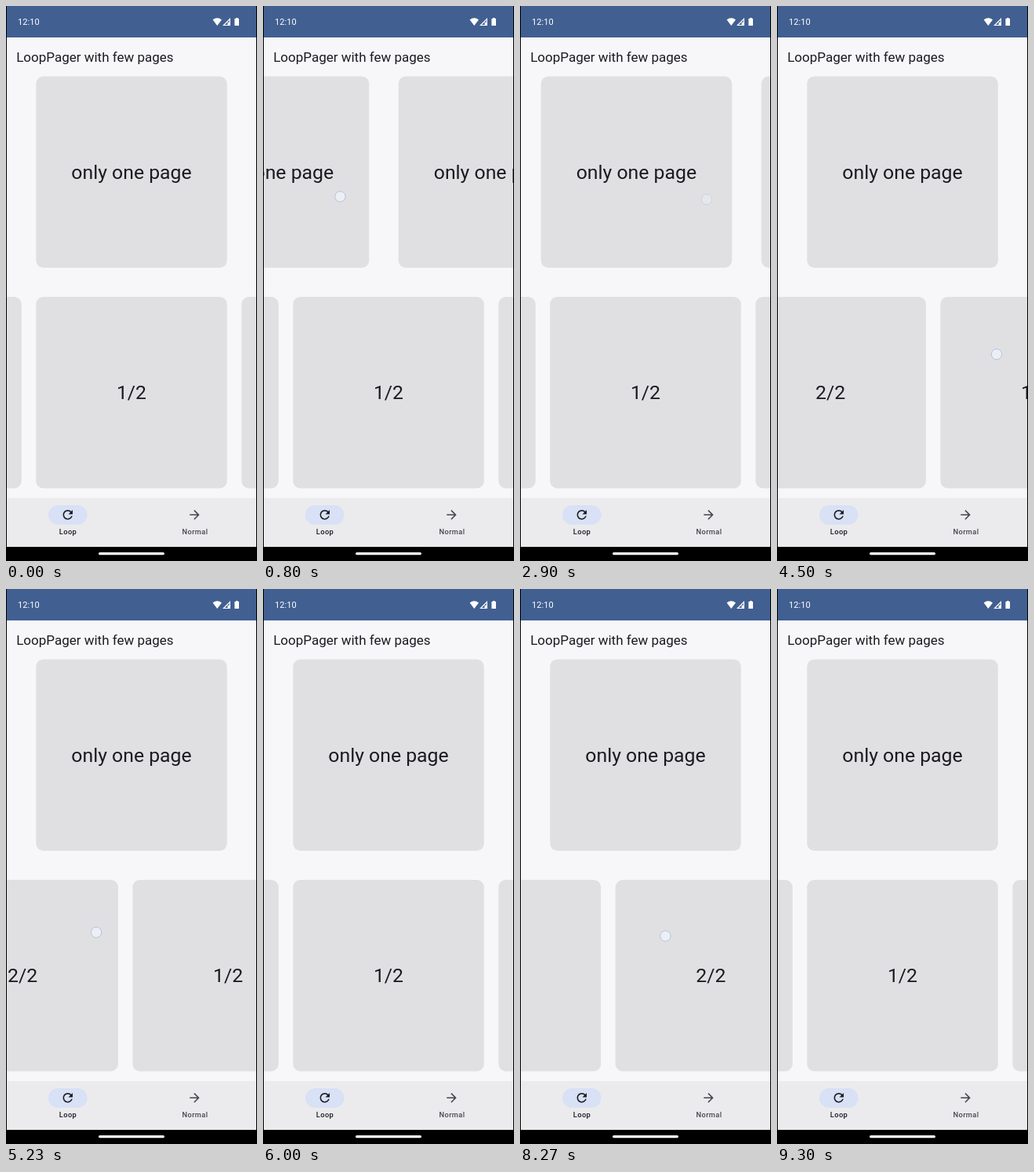
An HTML page for the animation above (9.33 s loop, 320 px wide and 706 px high).

```html
<!DOCTYPE html>
<html lang="en">
<head>
<meta charset="utf-8">
<title>LoopPager</title>
<style>
  html, body { margin: 0; width: 100%; height: 100%; overflow: hidden; background: #000; }
  svg { display: block; width: 320px; height: 706px; font-family: Roboto, sans-serif; fill: #1a1b20; }
  .card rect { fill: #e0e0e2; }
  .card text { font-size: 24.8px; text-anchor: middle; }
  .label { font-size: 9.3px; font-weight: 500; letter-spacing: .39px; text-anchor: middle; }
</style>
</head>
<body>
<svg viewBox="0 0 320 706">
  <clipPath id="screen"><rect x="1" width="318" height="688"/></clipPath>
  <rect width="320" height="706" fill="#000"/>
  <g clip-path="url(#screen)">
    <rect width="320" height="688" fill="#f7f7f9"/>
    <rect width="320" height="40" fill="#415f91"/>
    <g fill="#fff">
      <text x="15" y="24.3" font-size="11" letter-spacing=".1">12:10</text>
      <path d="M269.3 25 L263.6 17.6 Q269.3 13 275 17.6 Z"/>
      <path d="M286 15 V25 H276 Z M284.8 18 L278.9 23.9 H282.6 V20.8 H284.8 Z" fill-rule="evenodd"/>
      <path d="M293 15 h2.6 v1.1 h1.4 v8.9 h-5.6 v-8.9 h1.6 Z"/>
    </g>
    <text x="13.2" y="70.7" font-size="17">LoopPager with few pages</text>
    <g id="top"></g>
    <g id="bottom"></g>
    <rect y="626" width="320" height="62" fill="#ebebed"/>
    <rect x="54" y="635" width="49.5" height="24.8" rx="12.4" fill="#d8e1f5"/>
    <path transform="translate(69.5 638) scale(.774)" d="M17.65 6.35C16.2 4.9 14.21 4 12 4c-4.42 0-7.99 3.58-7.99 8s3.57 8 7.99 8c3.73 0 6.84-2.55 7.73-6h-2.08c-.82 2.33-3.04 4-5.65 4-3.31 0-6-2.69-6-6s2.69-6 6-6c1.66 0 3.14.69 4.22 1.78L13 11h7V4z"/>
    <path fill="#44474e" transform="translate(231.2 638) scale(.774)" d="M12 4l-1.41 1.41L16.17 11H4v2h12.17l-5.58 5.59L12 20l8-8z"/>
    <text class="label" x="79" y="671.7">Loop</text>
    <text class="label" x="241" y="671.7" fill="#44474e">Normal</text>
    <circle id="touch" r="6.7" fill="#f0f3f8" fill-opacity=".8" stroke="#a9c0e6" stroke-width=".9"/>
  </g>
  <rect x="118" y="695" width="84" height="3.2" rx="1.6" fill="#fff"/>
</svg>
<script>
const LOOP = 9330, SLOP = 7, FADE = 200;
const OMEGA = Math.sqrt(1500); // critically damped spring, stiffness 1500

const pagers = {
  top: { y: 89.5, pitch: 281, labels: ['only one page'] },
  bottom: { y: 370, pitch: 262, labels: ['1/2', '2/2'] },
};

// The finger drags from (x0, y0) to (x1, y1), rests there, then lets go at `release`.
const swipes = [
  { pager: 'top', page: 0, start: 530, end: 830, release: 1370, x0: 252, y0: 246, x1: 82, y1: 242 },
  { pager: 'top', page: 1, start: 2000, end: 2270, release: 2800, x0: 68, y0: 250, x1: 238, y1: 246 },
  { pager: 'bottom', page: 0, start: 3670, end: 3970, release: 4500, x0: 103, y0: 447, x1: 280, y1: 443 },
  { pager: 'bottom', page: -1, start: 5030, end: 5300, release: 5570, x0: 261, y0: 439, x1: 65, y1: 436 },
  { pager: 'bottom', page: 0, start: 6530, end: 6770, release: 7500, x0: 220, y0: 439, x1: 1, y1: 436 },
  { pager: 'bottom', page: 1, start: 8130, end: 8400, release: 8930, x0: 95, y0: 443, x1: 268, y1: 440 },
];

for (const [id, p] of Object.entries(pagers)) {
  p.node = document.getElementById(id);
  for (let page = -2; page <= 2; page++) {
    const n = p.labels.length, x = 38.3 + page * p.pitch;
    p.node.innerHTML += `<g class="card">
      <rect x="${x}" y="${p.y}" width="243.5" height="243.5" rx="9.3"/>
      <text x="${x + 121.7}" y="${p.y + 130.3}">${p.labels[(page + n) % n]}</text></g>`;
  }
}

const touch = document.getElementById('touch');
const clamp = v => Math.min(1, Math.max(0, v));

function render(t) {
  const shift = { top: 0, bottom: 0 };
  let opacity = 0;
  for (const s of swipes) {
    if (t < s.start) continue;
    const pitch = pagers[s.pager].pitch;
    const progress = clamp((t - s.start) / (s.end - s.start));
    const travel = (s.x1 - s.x0) * progress;
    const direction = Math.sign(s.x1 - s.x0);
    let drag = direction * Math.max(0, Math.abs(travel) - SLOP);
    if (t > s.release) {
      const z = OMEGA * (t - s.release) / 1000;
      const goal = direction * pitch;
      drag = goal + (drag - goal) * (1 + z) * Math.exp(-z);
    }
    shift[s.pager] = drag - s.page * pitch;
    opacity = 1 - clamp((t - s.release) / FADE);
    touch.setAttribute('cx', s.x0 + travel);
    touch.setAttribute('cy', s.y0 + (s.y1 - s.y0) * progress);
  }
  touch.setAttribute('opacity', opacity);
  for (const id in pagers) pagers[id].node.setAttribute('transform', `translate(${shift[id]} 0)`);
}

const began = performance.now();
function tick() {
  render((performance.now() - began) % LOOP);
  requestAnimationFrame(tick);
}
tick();
</script>
</body>
</html>
```
